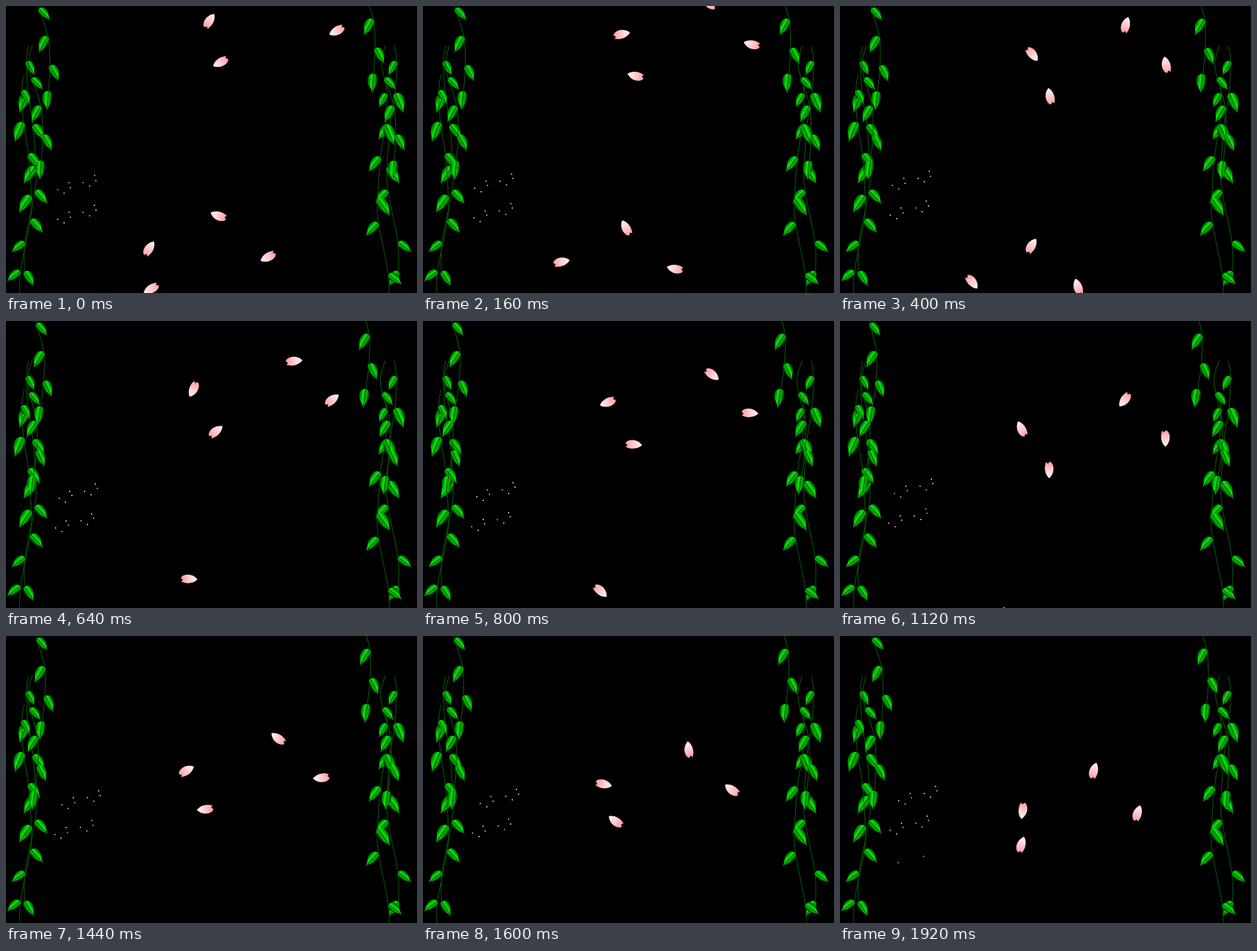
An HTML page with a canvas for the animation above (2000 ms loop, 580x406 px).

```html
<!DOCTYPE html>
<html lang="en">
<head>
<meta charset="utf-8">
<title>Falling petals between vines</title>
<style>
  html, body { margin: 0; width: 100%; height: 100%; overflow: hidden; background: #000; }
  canvas { display: block; width: 580px; height: 406px; }
</style>
</head>
<body>
<canvas id="stage" width="580" height="406"></canvas>
<script>
const ctx = document.getElementById('stage').getContext('2d');
const STEP = 80, LOOP = 2000;

// The stem runs from the top through every leaf base.
// Leaves alternate right and left: [x, y, lean from vertical in degrees, length].
const still = {
  top: [[32, 56]],
  leaves: [[29, 78, 29, 23], [31, 123, 23, 31], [38, 168, 38, 27], [42, 227, 35, 30],
           [41, 261, 43, 26], [27, 334, 53, 24], [26, 375, 32, 25]]
};
const hanging = {
  top: [[37, 56], [32, 80]],
  leaves: [[36, 102, 45, 23], [49, 141, 28, 27], [52, 182, 29, 26], [50, 218, 4, 28]]
};
const hangAt = [[0, 0], [10, -98.5], [498, 0], [469, -123]];

// Speeds in pixels and degrees per second.
const drifting = { x: 287, y: 21, vx: -44.9, ax: 15.5, vy: 117.7, ay: 0, angle: 33, spin: 268, stop: 999, wobble: 0 };
const settling = { x: 464.6, y: 35, vx: 7, ax: -14.5, vy: 123.2, ay: -5.6, angle: 241, spin: 265, stop: 737, wobble: 5 };
const entering = { x: 404.9, y: -25.3, vx: 15.6, ax: -19.5, vy: 135.6, ay: -12, angle: -97, spin: 280, stop: 375, wobble: 5 };
const leaving = { ...drifting, x: 301.7, y: 297, vx: -68, ax: 0, vy: 106, angle: 290, spin: 252, wobble: 5 };
const petals = [
  drifting, shifted(drifting, -85, 322),
  settling, shifted(settling, -164, 44.5), shifted(settling, -262, 365),
  entering, leaving, { ...leaving, x: 367.6, y: 355, angle: 241 }
];

const cluster = [[73, 260], [82, 265], [88.5, 250], [91, 256.5]];

function shifted(petal, dx, dy) {
  return { ...petal, x: petal.x + dx, y: petal.y + dy };
}

const rad = deg => deg * Math.PI / 180;
const noise = n => { const v = Math.sin(n * 12.9898) * 43758.5453; return v - Math.floor(v); };

function gradient(y0, y1, colors) {
  const g = ctx.createLinearGradient(0, y0, 0, y1);
  colors.forEach((c, i) => g.addColorStop(i / (colors.length - 1), c));
  return g;
}

// Draws with the origin moved, turned and scaled.
function placed(x, y, angle, sx, sy, paint) {
  ctx.save();
  ctx.translate(x, y);
  ctx.rotate(angle);
  ctx.scale(sx, sy);
  paint();
  ctx.restore();
}

function drawStem(points) {
  const at = i => points[Math.max(0, Math.min(i, points.length - 1))];
  ctx.beginPath();
  ctx.moveTo(...at(0));
  for (let i = 0; i < points.length - 1; i++) {
    const [a, b, c, d] = [at(i - 1), at(i), at(i + 1), at(i + 2)];
    ctx.bezierCurveTo(b[0] + (c[0] - a[0]) / 6, b[1] + (c[1] - a[1]) / 6,
                      c[0] - (d[0] - b[0]) / 6, c[1] - (d[1] - b[1]) / 6, c[0], c[1]);
  }
  ctx.strokeStyle = '#075f07';
  ctx.lineWidth = 1;
  ctx.stroke();
}

function halfLeaf(width, colors) {
  ctx.fillStyle = gradient(0, width * 0.8, colors);
  ctx.beginPath();
  ctx.moveTo(0.02, 0);
  ctx.bezierCurveTo(0.06, width, 0.42, width * 1.1, 0.68, width * 0.5);
  ctx.quadraticCurveTo(0.84, width * 0.15, 1, 0);
  ctx.closePath();
  ctx.fill();
}

function paintLeaf() {
  halfLeaf(-0.34, ['#00b800', '#0ce40c', '#00ac00', '#005400']);
  halfLeaf(0.24, ['#008c00', '#00bc00', '#007400', '#003c00']);
  ctx.lineWidth = 0.03;
  ctx.strokeStyle = '#005800';
  ctx.beginPath();
  ctx.moveTo(0, 0);
  ctx.quadraticCurveTo(0.4, -0.04, 0.9, 0);
  ctx.stroke();
}

function drawVine({ top, leaves }) {
  drawStem([...top, ...leaves]);
  leaves.forEach(([x, y, lean, size], i) => {
    const side = i % 2 ? -1 : 1;
    placed(x, y, rad(90 - side * lean), size, side * size, paintLeaf);
  });
}

function drawVines(t) {
  for (const [x, y, flip] of [[0, 0, 1], [580, 0, -1], [-6.5, 41, 1], [566.5, 45.5, -1]])
    placed(x, y, 0, flip, 1, () => drawVine(still));

  const swing = t < 0.96 ? t / 0.96 : (2 - t) / 1.04;
  const [px, py] = hanging.top[0];
  for (const [dx, dy] of hangAt)
    placed(px + dx, py + dy, swing * 0.102, 1, 1, () => {
      ctx.translate(-px, -py);
      drawVine(hanging);
    });
}

function paintPetal() {
  ctx.fillStyle = gradient(-12, 12, ['#fff4f2', '#ffd9d9', '#ffbcbe', '#ff979d']);
  ctx.beginPath();
  ctx.moveTo(0.5, -12);
  ctx.bezierCurveTo(5, -8, 8.5, 1, 4, 11);
  ctx.lineTo(1.5, 8.5);
  ctx.lineTo(-1, 11.5);
  ctx.lineTo(-3.5, 10);
  ctx.bezierCurveTo(-8.5, 3, -6, -7, 0.5, -12);
  ctx.fill();
}

function drawPetal(p, t) {
  const turn = rad(Math.min(p.angle + p.spin * t, p.stop));
  const x = p.x + p.vx * t + p.ax * t * t - p.wobble * Math.cos(turn);
  const y = p.y + p.vy * t + p.ay * t * t;
  placed(x, y, turn, 1, 1, paintPetal);
}

function drawSpark(x, y, seed, green) {
  const tall = noise(seed + 3) > 0.6;
  ctx.fillStyle = green ? '#3fd03f' : noise(seed + 7) > 0.5 ? '#d8c6c0' : '#c4a49c';
  ctx.fillRect(Math.round(x) - 1, Math.round(y) - 1, tall ? 1.5 : 2, tall ? 2 : 1.5);
}

function drawSparks(t) {
  const rise = -14.3 * t;
  const drift = [1.9 * t + 1.8 * t * t, -4 * Math.sin(Math.PI * t / 2.3)];
  for (let n = 0; n < 16; n++) {
    const row = n >> 3, column = n >> 2 & 1;
    const [x, y] = cluster[n % 4];
    const seed = n * 31 + Math.round(t * 1000 / STEP) * 7;
    drawSpark(x + column * 36 + drift[row], y - column * 10 + row * 42 + rise, seed, noise(seed) < 0.1);
  }
  // A new row starts to climb.
  if (t >= 1.76)
    for (const n of [0, 1]) drawSpark(81.5 + n * 36, 348.5 - n * 9 + rise, n, true);
}

const start = performance.now();
function draw() {
  const t = Math.floor((performance.now() - start) % LOOP / STEP) * STEP / 1000;
  ctx.clearRect(0, 0, 580, 406);
  drawVines(t);
  drawSparks(t);
  for (const p of petals) drawPetal(p, t);
  requestAnimationFrame(draw);
}
draw();
</script>
</body>
</html>
```
